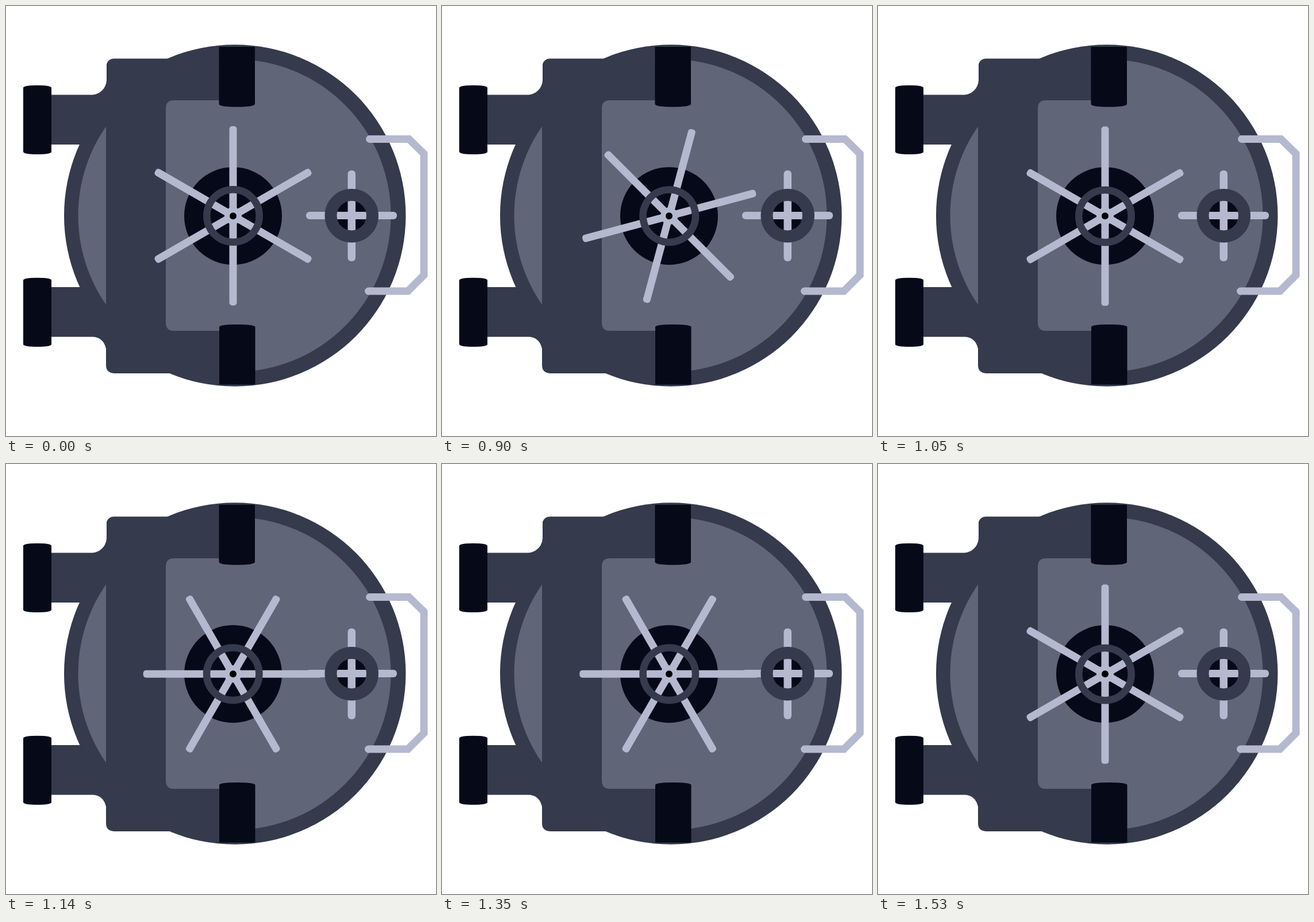
Write an HTML page that moves like this. It is 748 by 748 pixels and loops after 1770 ms.

```html
<!DOCTYPE html>
<html lang="en">
<head>
<meta charset="utf-8">
<title>Vault door</title>
<style>
  html, body { margin: 0; width: 100%; height: 100%; overflow: hidden; background: #fff; }
  svg { display: block; width: 100%; height: 100%; }
  .steel { fill: #353a4c; }
  .plate { fill: #606577; }
  .black { fill: #050918; }
  .bar { fill: #b4b9cf; }
  .ring { fill: none; stroke: #353a4c; }
</style>
</head>
<body>
<svg viewBox="0 0 748 748">
  <defs>
    <rect id="spoke" class="bar" x="388.5" y="209" width="13" height="312" rx="5"/>
    <path id="hinge" class="black" d="M30 142Q32 138 54.500 138T79 142V254Q77 258 54.500 258T30 254Z"/>
  </defs>

  <!-- hinge arms -->
  <path class="steel" d="M78 154.500H150C164 154 175 142 175 128H190V241H78Z"/>
  <path class="steel" d="M78 489H190V596H174C171 583 163 575.500 150 575.500H78Z"/>
  <use href="#hinge"/>
  <use href="#hinge" y="334.700"/>

  <!-- door -->
  <circle class="steel" cx="398.200" cy="364.500" r="297.200"/>
  <circle class="plate" cx="397.500" cy="364.500" r="272"/>
  <path class="steel" d="M175 130V101Q178 91.500 188 91.500H402V639H188Q174 638 174 625V212Z"/>
  <path class="plate" d="M410 164H292Q278 164 278 178V551Q278 565 292 565H410Z"/>
  <path class="black" d="M370.500 71H433V171Q430 175.500 401.500 175.500T370.500 171Z"/>
  <path class="black" d="M371 658.500H433.500V558Q430 554 402 554T371 558Z"/>

  <!-- handle -->
  <path d="M632.500 231.500H701L727 257V468L699 496H630.500" fill="none" stroke="#b4b9cf" stroke-width="13" stroke-linecap="round"/>

  <!-- wheel -->
  <circle class="black" cx="395" cy="365.200" r="85"/>
  <g id="wheel">
    <use href="#spoke"/>
    <use href="#spoke" transform="rotate(60 395 365)"/>
    <use href="#spoke" transform="rotate(120 395 365)"/>
    <circle class="bar" cx="395" cy="365" r="15"/>
    <circle class="ring" cx="395" cy="365" r="45.700" stroke-width="12.500"/>
    <circle cx="395" cy="365.300" r="6"/>
  </g>

  <!-- dial -->
  <circle class="black" cx="601.200" cy="364.700" r="30"/>
  <rect class="bar" x="594.500" y="286" width="13.500" height="158" rx="6"/>
  <rect class="bar" x="522" y="358" width="158" height="13" rx="6"/>
  <circle class="ring" cx="601.200" cy="364.700" r="36.200" stroke-width="21"/>
</svg>
<script>
  const LOOP = 1770, START = 750, STEP = 30;
  const quarterTurns = [6, 4, 3, 3, 4, 6]; // steps spent on each 90 degrees
  const wheel = document.getElementById('wheel');

  function angleAt(time) {
    let steps = Math.max(0, Math.floor((time - START) / STEP));
    let angle = 0;
    for (const length of quarterTurns) {
      angle += 90 * Math.min(1, steps / length);
      steps = Math.max(0, steps - length);
    }
    return angle;
  }

  let origin;
  function draw(now) {
    origin ??= now;
    const angle = angleAt((now - origin) % LOOP);
    wheel.setAttribute('transform', `rotate(${angle} 395 365.300)`);
    requestAnimationFrame(draw);
  }
  requestAnimationFrame(draw);
</script>
</body>
</html>
```
